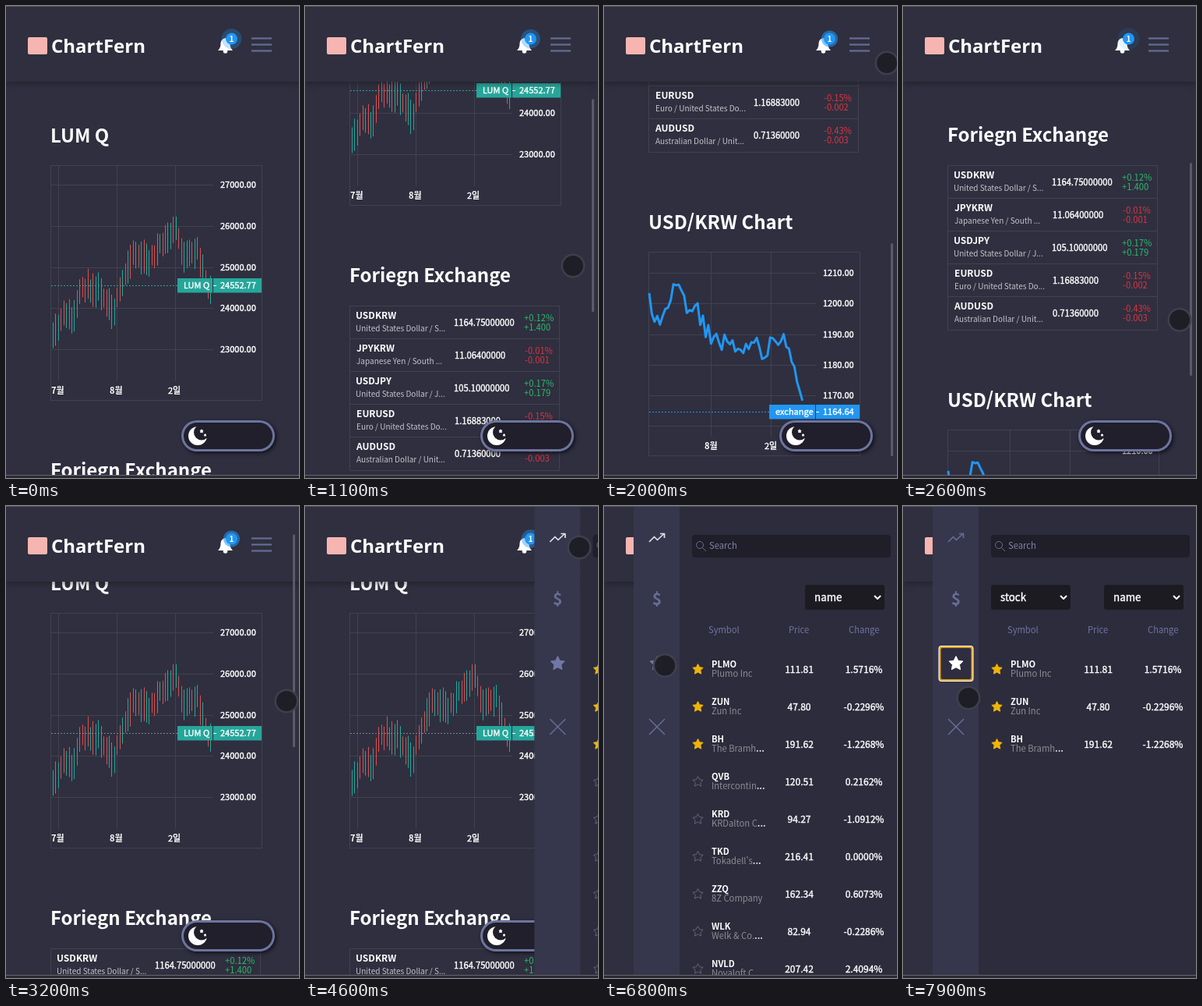
An HTML page with a canvas for the animation above (8000 ms loop, 376 px wide and 605 px high).

```html
<!DOCTYPE html>
<html lang="ko">
<head>
<meta charset="utf-8">
<title>Market dashboard</title>
<style>
html, body { margin: 0; width: 100%; height: 100%; overflow: hidden; background: #2f2f3f; }
canvas { display: block; }
</style>
</head>
<body>
<canvas id="stage" width="376" height="605"></canvas>
<script>
const g = document.getElementById('stage').getContext('2d');
const LOOP = 8000, W = 376, H = 605;
const SANS = '"Noto Sans CJK KR", "Noto Sans CJK JP", "Noto Sans", sans-serif';
const BG = '#2f2f3f', GRID = '#41414f', TEAL = '#26a69a', RED = '#d9504f', BLUE = '#2196f3',
  SLATE = '#666d95', GOLD = '#efb408';
const OPEN_AT = 4505, STAR_AT = 7200;

// keys: [time or x, values...]
const SCROLL = [[500, 0], [1100, 250], [2000, 658], [2250, 658], [3080, 67]];
const POINTER = [[150, 400, 560], [550, 344, 560], [1100, 344, 333], [1480, 350, 430], [2000, 363, 73],
  [2750, 354, 440], [3200, 360, 250], [4350, 352, 53], [5100, 352, 53], [5500, 347, 88], [6950, 70, 208],
  [7250, 70, 208], [7900, 84, 246]];
const INDEX_TREND = [[60, 427], [76, 392], [86, 405], [97, 360], [120, 362], [138, 392], [162, 315], [182, 328],
  [205, 300], [218, 285], [228, 325], [245, 312], [260, 364]];
const RATE_TREND = [[58, 380], [72, 410], [88, 366], [97, 368], [107, 394], [120, 390], [132, 418], [178, 446],
  [188, 424], [205, 444], [222, 424], [238, 430], [249, 487], [258, 520]];

const PAIRS = [
  ['USDKRW', 'United States Dollar / S...', '1164.75000000', '+0.12%', '+1.400'],
  ['JPYKRW', 'Japanese Yen / South ...', '11.06400000', '-0.01%', '-0.001'],
  ['USDJPY', 'United States Dollar / J...', '105.10000000', '+0.17%', '+0.179'],
  ['EURUSD', 'Euro / United States Do...', '1.16883000', '-0.15%', '-0.002'],
  ['AUDUSD', 'Australian Dollar / Unit...', '0.71360000', '-0.43%', '-0.003']];
const STOCKS = [
  ['PLMO', 'Plumo Inc', '111.81', '1.5716%'],
  ['ZUN', 'Zun Inc', '47.80', '-0.2296%'],
  ['BH', 'The Bramh...', '191.62', '-1.2268%'],
  ['QVB', 'Intercontin...', '120.51', '0.2162%'],
  ['KRD', 'KRDalton C...', '94.27', '-1.0912%'],
  ['TKD', 'Tokadell\'s...', '216.41', '0.0000%'],
  ['ZZQ', '8Z Company', '162.34', '0.6073%'],
  ['WLK', 'Welk & Co....', '82.94', '-0.2286%'],
  ['NVLD', 'Novaloft C', '207.42', '2.4094%']];

const smooth = p => { p = Math.max(0, Math.min(1, p)); return p * p * (3 - 2 * p); };
const linear = p => p;

function at(keys, t, ease = smooth) {
  const n = keys.findIndex(k => k[0] >= t);
  if (n < 0) return keys[keys.length - 1].slice(1);
  if (n === 0) return keys[0].slice(1);
  const a = keys[n - 1], b = keys[n], p = ease((t - a[0]) / (b[0] - a[0]));
  return a.slice(1).map((v, i) => v + (b[i + 1] - v) * p);
}
function random(seed) {
  return () => (seed = seed * 16807 % 2147483647) / 2147483647;
}

// y is the middle of the capitals; weight 500 thickens the regular face
function text(s, x, y, size, color = '#fff', weight = 400, align = 'left', family = SANS) {
  const medium = weight === 500;
  g.font = `${medium ? 400 : weight} ${size}px ${family}`;
  g.textAlign = align;
  g.fillStyle = g.strokeStyle = color;
  g.fillText(s, x, y + size * 0.366);
  g.lineWidth = 0.4;
  if (medium) g.strokeText(s, x, y + size * 0.366);
}
function rect(x, y, w, h, color) { g.fillStyle = color; g.fillRect(x, y, w, h); }
function round(x, y, w, h, r, color) {
  g.beginPath(); g.roundRect(x, y, w, h, r); g.fillStyle = color; g.fill();
}
function disc(x, y, r, color) { g.beginPath(); g.arc(x, y, r, 0, 7); g.fillStyle = color; g.fill(); }
function line(points, color, width = 1, dash = []) {
  g.beginPath();
  for (const [x, y] of points) g.lineTo(x, y);
  g.strokeStyle = color; g.lineWidth = width; g.setLineDash(dash); g.stroke(); g.setLineDash([]);
}
function frame(x, y, w, h) { g.strokeStyle = GRID; g.lineWidth = 1; g.strokeRect(x, y, w, h); }
function star(x, y, r, color, filled) {
  g.beginPath();
  for (let i = 0; i < 10; i++) {
    const a = i * Math.PI / 5 - Math.PI / 2, d = i % 2 ? r * 0.5 : r;
    g.lineTo(x + d * Math.cos(a), y + d * Math.sin(a));
  }
  g.closePath(); g.lineJoin = 'round'; g.lineWidth = 1;
  g.strokeStyle = g.fillStyle = color; g.stroke();
  if (filled) g.fill();
}

function grid(top, bottom, firstY, stepY, rows, xs, right) {
  for (let i = 0; i < rows; i++) {
    const y = Math.round(firstY + i * stepY) + 0.5;
    line([[57, y], [right, y]], GRID);
  }
  for (const x of xs) line([[x, top], [x, bottom]], GRID);
}
function scale(x, firstY, stepY, first, step) {
  for (let i = 0; i < 5; i++) text(first - i * step + '.00', x, Math.round(firstY + i * stepY), 11, '#fff', 500);
}
function priceTag(label, value, y, split, left, valueX, color, dotted) {
  line([[58, y + 0.5], [left, y + 0.5]], dotted, 1, [2, 2]);
  rect(left, y - 9, split - left, 18.5, color);
  rect(split + 1, y - 9, 328 - split - 1, 18.5, color);
  line([[split + 1, y + 0.5], [split + 5, y + 0.5]], '#fff');
  text(label, left + 8, y, 11, '#fff', 500);
  text(value, valueX, y, 11, '#fff', 500);
}

function indexChart(t) {
  text('LUM Q', 57, 166, 24, '#fff', 700);
  grid(205, 481, 229, 52.75, 5, [67.5, 142.5, 217.5], 266);
  frame(57.5, 204.5, 271, 301);
  scale(275, 229, 52.75, 27000, 1000);
  const rnd = random(11);
  for (let i = 0; i < 60; i++) {
    const x = 60 + i * 3.43, mid = at(INDEX_TREND, x, linear)[0] + rnd() * 10 - 5, half = 12 + rnd() * 10;
    rect(Math.round(x), mid - half, 1, half * 2, rnd() < 0.52 ? TEAL : RED);
  }
  priceTag('LUM Q', '24552.77', 358, 265, 220, 275, TEAL, t < 2500 ? TEAL : '#77878c');
  text('7월', 58, 493, 11, '#fff', 700);
  text('8월', 133, 493, 11, '#fff', 700);
  text('2일', 208, 493, 11, '#fff', 500);
}

function forexTable() {
  text('Foriegn Exchange', 57, 595, 24, '#fff', 700);
  frame(57.5, 634.5, 269, 211);
  PAIRS.forEach(([name, full, price, pct, diff], i) => {
    const x = name.startsWith('USD') ? 65 : 66, y = 634 + i * 42;
    const color = pct[0] === '+' ? '#2dbb6c' : '#de3440';
    if (i) line([[58, y + 0.5], [326, y + 0.5]], GRID);
    text(name, x, y + 13, 12, '#fff', 700);
    text(full, x, y + 29, 10, '#c4c4cc');
    text(price, x + 126, y + 22, 11.2, '#fff', 500);
    text(pct, x + 216, y + 16, 11.2, color);
    text(diff, x + 216, y + 28, 11.2, color);
  });
}

function rateChart() {
  g.save();
  g.translate(0, 658);
  text('USD/KRW Chart', 57, 277, 24, '#fff', 700);
  grid(316, 552, 342, 39.25, 6, [137.5, 214.5], 272);
  frame(57.5, 315.5, 271, 261);
  scale(281, 342, 39.25, 1210, 10);
  const rnd = random(29), rate = [];
  for (let x = 58; x <= 258; x += 3.45) {
    const swing = x < 242 ? 24 : 4;
    rate.push([x, at(RATE_TREND, x, linear)[0] + (rnd() - 0.5) * swing]);
  }
  g.lineJoin = 'round';
  line(rate, BLUE, 3);
  priceTag('exchange', '1164.64', 520, 271, 212, 281, BLUE, BLUE);
  text('8월', 129, 564, 11, '#fff', 700);
  text('2일', 206, 564, 11, '#fff', 500);
  g.restore();
}

function header(t) {
  g.save();
  g.shadowColor = 'rgba(20,20,30,.55)'; g.shadowBlur = 8; g.shadowOffsetY = 2;
  rect(0, 0, W, 97, BG);
  g.restore();
  round(28, 40, 25, 22, 2, '#f6b5b1');
  text('ChartFern', 58, 51, 24, '#fff', 700, 'left', '"Open Sans", "Noto Sans", sans-serif');

  g.fillStyle = '#fff';
  g.beginPath();
  g.moveTo(272, 57); g.quadraticCurveTo(275.5, 54, 275.5, 48);
  g.bezierCurveTo(276, 39, 287, 39, 287.5, 48);
  g.quadraticCurveTo(287.5, 54, 291, 57);
  g.fill();
  disc(281.5, 58, 2.8, '#fff');
  const p = (t / 1200 + 0.7) % 1;
  g.globalAlpha = 0.9 * (1 - p);
  disc(289.5, 42, 8 + 7 * p, BLUE);
  g.globalAlpha = 1;
  disc(289.5, 42, 7.5, BLUE);
  text('1', 289.5, 42, 10, '#fff', 700, 'center');
  for (let y = 41.5; y < 60; y += 8) line([[315, y], [341, y]], SLATE, 2.2);
}

function toggle() {
  g.save();
  g.shadowColor = 'rgba(10,10,18,.8)'; g.shadowBlur = 5; g.shadowOffsetX = g.shadowOffsetY = 2;
  round(225, 531, 120, 40, 20, '#6d749f');
  g.restore();
  round(228, 534, 114, 34, 17, '#201f2b');
  disc(246, 551, 12, '#fff');
  disc(251, 546.5, 10, '#201f2b');
  star(251, 545, 2.2, '#fff', true);
  star(255.5, 550, 1.5, '#fff', true);
}

function select(x, label) {
  round(x, 101, 102, 32, 3, '#1b1b21');
  text(label, x + 12, 117, 13.33, '#fff', 500);
  line([[x + 89, 115], [x + 93, 119], [x + 97, 115]], '#fff', 2);
}

function sidebar(t) {
  const p = smooth((t - OPEN_AT) / 300), starred = t >= STAR_AT;
  if (!p) return;
  g.save();
  g.translate(338 * (1 - p), 0);
  rect(38, 0, 59, H, '#36364c');
  rect(97, 0, W, H, '#2d2c3c');

  if (starred) {
    round(45.5, 179, 45, 46, 4, '#fff');
    round(46.5, 180, 43, 44, 3, '#e8a51c');
    round(48.5, 182, 39, 40, 2, '#2e2e40');
  }
  const trend = starred ? SLATE : '#e2e2e6';
  line([[58, 46], [64.5, 39.5], [68.5, 43.5], [77, 35.5]], trend, 1.7);
  line([[72, 35.5], [77.5, 35.5], [77.5, 41]], trend, 1.7);
  text('$', 68, 119, 21, SLATE, 700, 'center');
  star(68, 202, 9.5, starred ? '#fff' : '#7178a6', true);
  line([[58, 273], [78, 293]], SLATE, 1.6);
  line([[78, 273], [58, 293]], SLATE, 1.6);

  round(113, 37, 255, 29, 4, '#1f1e29');
  g.beginPath(); g.arc(123, 50, 4.5, 0, 7); g.strokeStyle = SLATE; g.lineWidth = 1; g.stroke();
  line([[126.5, 53.5], [131, 58]], SLATE);
  text('Search', 135, 51, 11.2, '#7f83a6');
  if (starred) select(113, 'stock');
  select(258, 'name');
  text('Symbol', 134, 159, 11.2, '#6e75a4');
  text('Price', 237, 159, 11.2, '#6e75a4');
  text('Change', 314, 159, 11.2, '#6e75a4');

  STOCKS.slice(0, starred ? 3 : 9).forEach(([code, name, price, change], i) => {
    const y = 209 + i * 48;
    star(120.5, y + 0.5, 7, i < 3 ? GOLD : '#63637a', i < 3);
    text(code, 138, y - 6, 11.2, '#fff', 700);
    const short = name.replace(/\.\.\.$/, '');
    text(short, 138, y + 6, 11.2, '#8c8c93');
    if (short !== name) text('...', 138 + g.measureText(short).width, y + 6, 11.2, '#e4e4e8', 700);
    text(price, 250.5, y + 0.5, 12, '#fff', 500, 'center');
    text(change, 333.5, y + 0.5, 12, '#fff', 500, 'center');
  });
  g.restore();
}

function pointer(t) {
  const [x, y] = at(POINTER, t);
  g.globalAlpha = 0.93;
  disc(x, y, 15.5, '#41414c');
  disc(x, y, 13, '#1c1c25');
  g.globalAlpha = 1;
}

function draw(now) {
  const t = now % LOOP, scroll = at(SCROLL, t)[0];
  rect(0, 0, W, H, BG);
  g.save();
  g.translate(0, -Math.round(scroll));
  indexChart(t);
  forexTable();
  rateChart();
  g.restore();
  header(t);
  toggle();
  if (t > 500 && t < 3700) round(368, 6 + scroll * 0.453, 3, 273, 1.5, '#5b5b67');
  sidebar(t);
  pointer(t);
  rect(0, 0, W, 1, '#55555b');
  rect(0, 601, W, 1, '#66666c');
  rect(0, 602, W, 3, '#2b2a35');
  requestAnimationFrame(draw);
}
requestAnimationFrame(draw);
</script>
</body>
</html>
```
